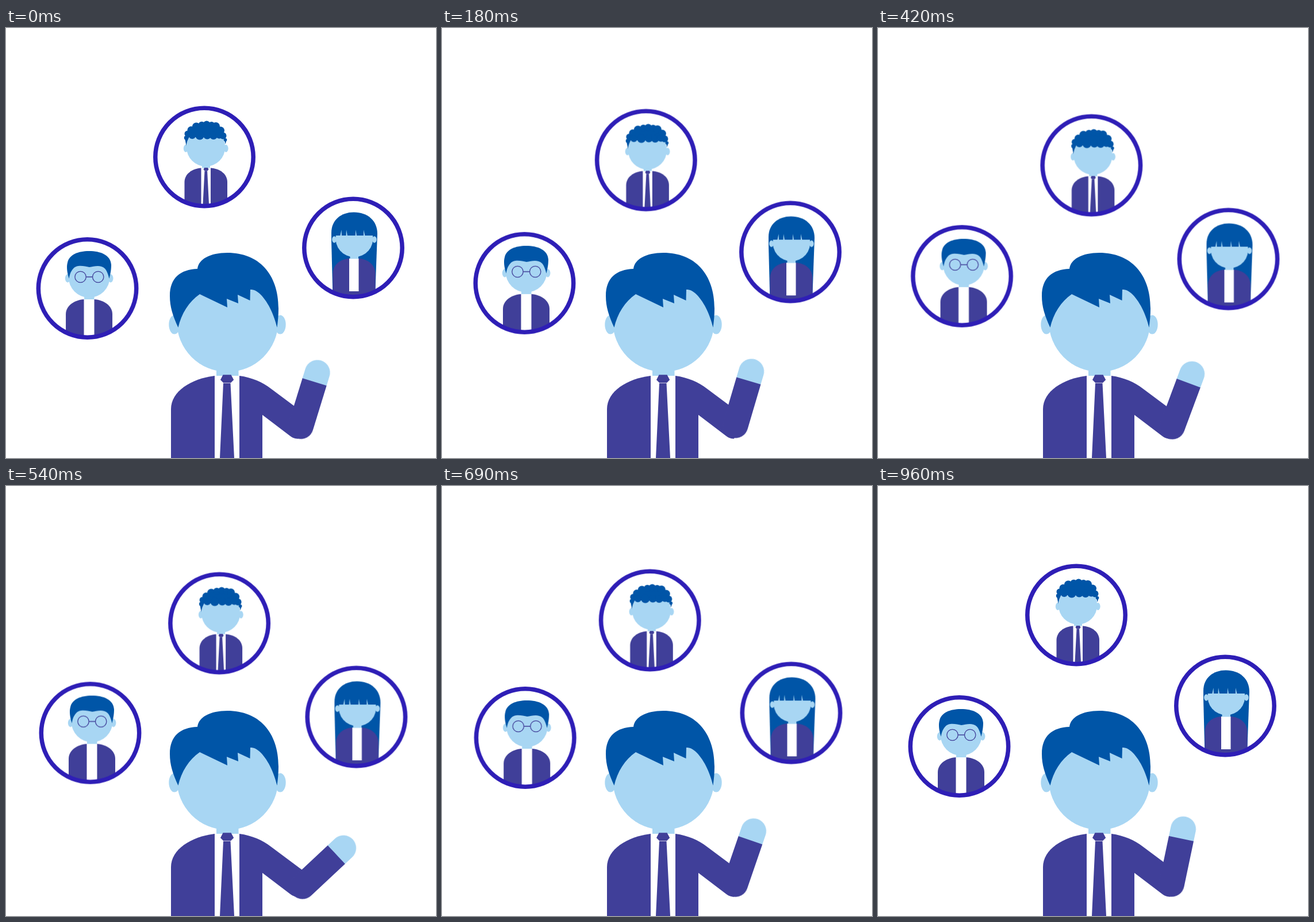
Animation, 748 px wide and 748 px high, one loop 990 ms. Source, as an HTML page:

```html
<!DOCTYPE html>
<html lang="en">
<head>
<meta charset="utf-8">
<title>Waving colleague</title>
<style>
  html, body { margin: 0; width: 100%; height: 100%; overflow: hidden; background: #fff; }
  svg { display: block; width: 100vw; height: 100vh; }
  .skin { fill: #a8d6f3; }
  .hair { fill: #0055a7; }
  .suit { fill: #403f99; }
  .white { fill: #fff; }
  .ring { fill: none; stroke: #2e1eb6; stroke-width: 7.5; }
  .specs { fill: none; stroke: #403f99; stroke-width: 1.3; }

  .bubble { animation: drift 990ms cubic-bezier(.33, 0, .67, 1) infinite; }
  .curly { --dx: 26.5px; --dy: 14.5px; }
  .long { --dx: 5.5px; --dy: 19.5px; }
  .glasses { --dx: 5px; --dy: -23.5px; animation-name: glide; animation-timing-function: linear; }
  .forearm { animation: wave 990ms linear infinite; }

  @keyframes drift {
    0%, 96%, 100% { transform: translate(0, 0); }
    44.4%, 51.5% { transform: translate(var(--dx), var(--dy)); }
  }
  @keyframes glide {
    0%, 97%, 100% { transform: translate(0, 0); }
    47%, 54.5% { transform: translate(var(--dx), var(--dy)); }
  }
  @keyframes wave {
    0% { transform: translate(512.8px, 693px) rotate(16.6deg); }
    6.061% { transform: translate(515.6px, 696.6px) rotate(46.9deg); }
    18.182% { transform: translate(510.5px, 691.4px) rotate(16.6deg); }
    21% { transform: translate(510.5px, 692px) rotate(12deg); }
    30.303% { transform: translate(514.9px, 696.1px) rotate(41.4deg); }
    33.5% { transform: translate(515.6px, 696.6px) rotate(46.9deg); }
    45.5% { transform: translate(510.8px, 692.6px) rotate(11.7deg); }
    48.5% { transform: translate(512.8px, 693px) rotate(16.6deg); }
    54.545%, 56% { transform: translate(515.6px, 696.6px) rotate(46.9deg); }
    69.697% { transform: translate(510.2px, 692.9px) rotate(19.2deg); }
    72.5% { transform: translate(510.5px, 692px) rotate(12deg); }
    81.818% { transform: translate(514.9px, 696.3px) rotate(41.3deg); }
    85% { transform: translate(515.6px, 696.6px) rotate(46.9deg); }
    96.97% { transform: translate(510.8px, 692.6px) rotate(11.7deg); }
    100% { transform: translate(512.8px, 693px) rotate(16.6deg); }
  }
</style>
</head>
<body>
<svg viewBox="0 0 748 748">
  <defs>
    <clipPath id="clipCurly"><circle cx="345" cy="224.5" r="85"/></clipPath>
    <clipPath id="clipGlasses"><circle cx="141.5" cy="453" r="85"/></clipPath>
    <clipPath id="clipLong"><circle cx="604" cy="382.5" r="85"/></clipPath>
  </defs>

  <g class="bubble curly">
    <g clip-path="url(#clipCurly)">
      <g class="skin">
        <ellipse cx="312.7" cy="209.5" rx="3.9" ry="6.4"/>
        <ellipse cx="382.7" cy="209.5" rx="3.9" ry="6.4"/>
        <circle cx="347.6" cy="207.3" r="33.6"/>
        <path d="M341 236h14v7.5h-14z"/>
      </g>
      <g class="hair">
        <path d="M316 182L331 170L349 166L366 171L377 182L378 190L370 189L347 190L330 190L317 188Z"/>
        <path d="M311 191L313.6 205Q315 195 320 188ZM375 188Q380 193 381.6 202L384 194Z"/>
        <circle cx="313.5" cy="191" r="3.7"/>
        <circle cx="316" cy="184" r="5.5"/>
        <circle cx="322" cy="177.5" r="6.5"/>
        <circle cx="331" cy="171.5" r="7"/>
        <circle cx="340.5" cy="168.7" r="6"/>
        <circle cx="349" cy="167.5" r="6"/>
        <circle cx="357.5" cy="169" r="6"/>
        <circle cx="365" cy="171" r="7"/>
        <circle cx="373" cy="178.5" r="7"/>
        <circle cx="377.5" cy="187.5" r="6"/>
        <circle cx="381.5" cy="194.5" r="2.8"/>
        <circle cx="324" cy="187" r="6"/>
        <circle cx="337" cy="187" r="7.6"/>
        <circle cx="350" cy="186.5" r="7"/>
        <circle cx="361" cy="187" r="7"/>
        <circle cx="371" cy="186" r="6.5"/>
      </g>
      <g class="suit">
        <path d="M310.5 306V268C310.5 254 324 244.5 339.5 243.5V306Z"/>
        <path d="M356 306V243.5C372 244.5 385 254 385 268V306Z"/>
        <path d="M345 243h6l1.5 3l-2 2.5h-5l-2-2.5zM345.5 248.8h4.6L353 306H342.5Z"/>
      </g>
    </g>
    <circle class="ring" cx="345" cy="224.5" r="85.2"/>
  </g>

  <g class="bubble glasses">
    <g clip-path="url(#clipGlasses)">
      <g class="skin">
        <ellipse cx="107.2" cy="435.5" rx="4.4" ry="7.2"/>
        <ellipse cx="182" cy="435.5" rx="4.4" ry="7.2"/>
        <circle cx="144.6" cy="433" r="36"/>
        <path d="M136 465h17.5v7H136z"/>
      </g>
      <path class="hair" d="M109.7 436C106 425 105 415 107 408C110 394 126 388 144 388C165 388 182 395 183 412C183 422 181 430 179.5 436C178 430 176 423 172 418.5C164 411 153 415 145 416C136 414 123 411 117 418.5C112 424 110.5 430 109.7 436Z"/>
      <g class="specs">
        <circle cx="129.5" cy="433" r="9.7"/>
        <circle cx="160.2" cy="433" r="9.7"/>
        <path d="M139.2 433h11.3"/>
      </g>
      <g class="suit">
        <path d="M104 540V498C104 483 119 473 135.5 472V540Z"/>
        <path d="M153.5 540V472C170 473 185 483 185 498V540Z"/>
      </g>
    </g>
    <circle class="ring" cx="141.5" cy="453" r="85.2"/>
  </g>

  <g class="bubble long">
    <g clip-path="url(#clipLong)">
      <path class="hair" d="M568.5 468L566 370V356C566 334 583 320.5 605 320.5C629 320.5 646 335 646 358L642 468Z"/>
      <path class="suit" d="M568.5 470V428C568.5 412 581 402 597 401H613.5C630 402 642.5 412 642.5 428V470Z"/>
      <path class="white" d="M597 401h16.5v57H597z"/>
      <g class="skin">
        <path d="M598.5 394h14.5v7.5h-14.5z"/>
        <ellipse cx="571" cy="368" rx="3.9" ry="5.7"/>
        <ellipse cx="640.8" cy="368" rx="3.9" ry="5.7"/>
        <path d="M573.8 361A32.5 32.5 0 1 0 638 361Z"/>
        <path d="M583.5 351L581.3 361.5H584ZM592 351L591.5 361.5H594ZM608.3 351L607.7 361.5H610ZM622 351L622 361.5H624.5Z"/>
      </g>
    </g>
    <circle class="ring" cx="604" cy="382.5" r="85.2"/>
  </g>

  <g class="skin">
    <ellipse cx="293" cy="516" rx="9.7" ry="16.5"/>
    <ellipse cx="477" cy="516" rx="9.7" ry="16.5"/>
    <circle cx="385.3" cy="510" r="88.3"/>
    <path d="M366 588h38.5v17H366z"/>
  </g>
  <path class="hair" d="M299.5 521C290 500 285 485 285 466C285 435 303 420 333 419C335 402 355 391 385 391C440 391 474 428 474 488C474 500 473 510 471.5 521C466 498 455 474 440 461Q432 454 425 455L424.5 474L403 464L404 479L384 471L385 486L337 463C318 476 305 497 299.5 521Z"/>
  <g class="suit">
    <path d="M287 748V663C287 632 322 610 363 605V748Z"/>
    <path d="M406 748V605C428 608 446 616 461 627.5L518 670L515 692L508 714.5Q500 714.5 494 709.5L446 673V748Z"/>
    <path d="M377.5 603.3h14l4.7 8.7l-5.2 5.2h-12.8l-5.2-5.2zM378 617.9h12.5L397 748H372Z"/>
  </g>
  <g class="forearm">
    <path class="skin" d="M-22-80V-98A22 22 0 0 1 22-98V-80Z"/>
    <path class="suit" d="M-22-81H22V0A22 22 0 0 1-22 0Z"/>
  </g>
</svg>
</body>
</html>
```
